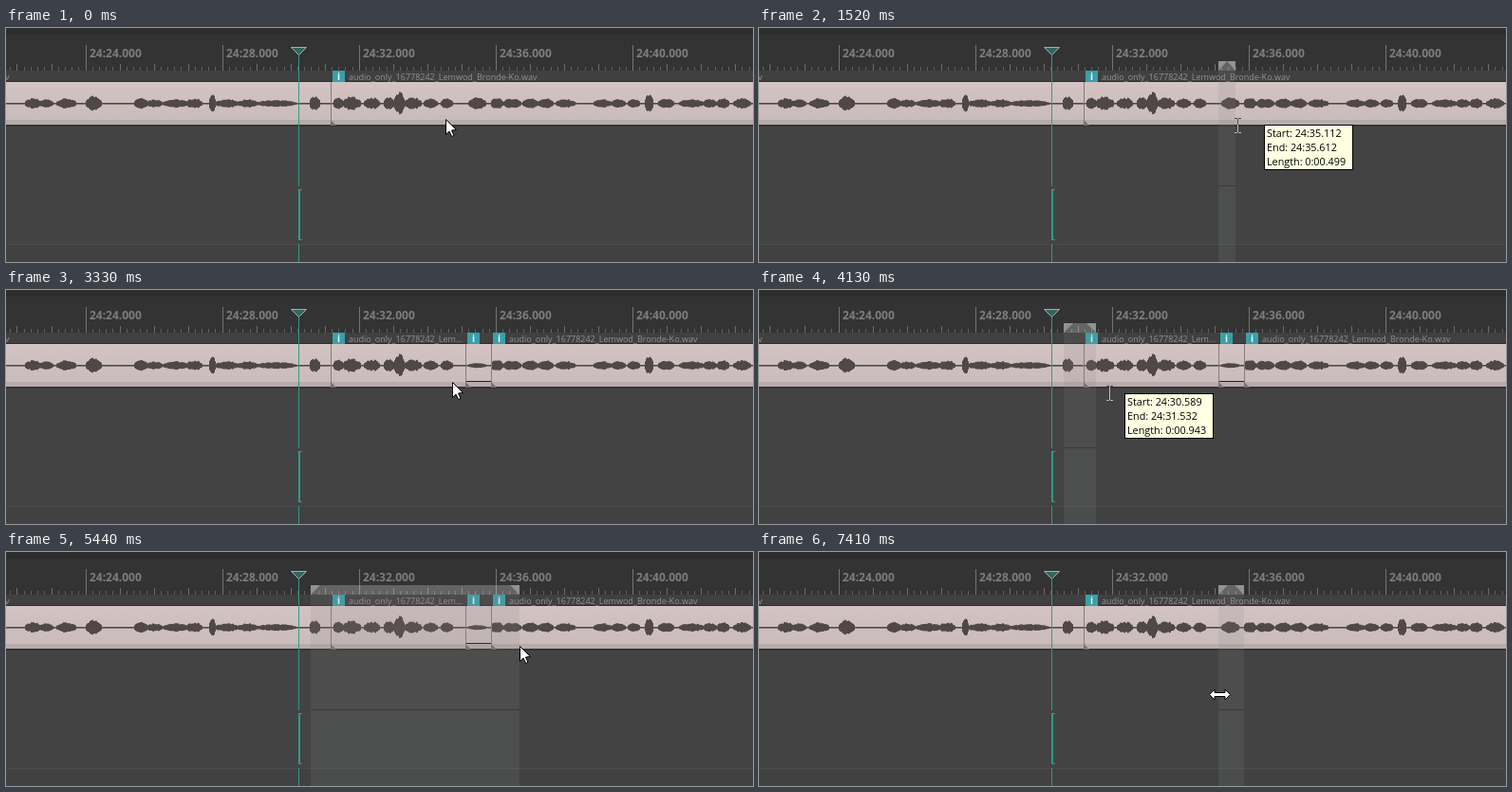
An HTML page with a canvas that plays this animation: 787 px wide and 247 px high, repeating every 8 s.

```html
<!DOCTYPE html>
<html lang="en">
<head>
<meta charset="utf-8">
<title>Audio timeline</title>
<style>
html, body { margin: 0; width: 100%; height: 100%; overflow: hidden; background: #434343; }
canvas { display: block; }
</style>
</head>
<body>
<canvas id="stage" width="787" height="247"></canvas>
<script>
const ctx = document.getElementById('stage').getContext('2d');
const W = 787, H = 247, LOOP = 8000;
const SEC_PER_PX = 0.02775;
const FONT = '"Open Sans", "Noto Sans", sans-serif';
const CLIP = 'audio_only_16778242_Lemwod_Bronde-Ko.wav';
const TEAL = '#2f9a8c';

// Each layout lists clips as [left edge, label]; quiet is the attenuated span.
const LAYOUTS = [
  { clips: [[342, CLIP]], quiet: [0, 0] },
  { clips: [[342, CLIP.slice(0, 23) + '...'], [484, ''], [511, CLIP]], quiet: [484, 511] },
  { clips: [[321, ''], [342, '[-10.00dB] ' + CLIP.slice(0, 15) + '...'], [484, ''], [511, ''], [541, CLIP]],
    quiet: [321, 541] }
];

// Every step changes only the properties it names.
const STEPS = [
  [0, { cursor: 'arrow', x: 463, y: 96, layout: 0, from: 0, to: 0, tip: 0 }],
  [120, { x: 464 }],
  [270, { x: 472, y: 99 }],
  [390, { x: 482, y: 101 }],
  [510, { cursor: 'beam', x: 499, y: 106 }],
  [760, { x: 496, y: 107 }],
  [880, { x: 490, y: 109 }],
  [1000, { x: 486, y: 110 }],
  [1250, { x: 491, y: 110 }],
  [1400, { x: 498, y: 108, from: 484, to: 494, tip: 107 }],
  [1520, { x: 504, y: 103, to: 502, tip: 102 }],
  [1640, { x: 508, y: 102, to: 506, tip: 101 }],
  [1760, { x: 511, y: 102, to: 509, tip: 101 }],
  [1880, { x: 513, y: 101, to: 511, tip: 100 }],
  [2270, { cursor: 'arrow', x: 511, y: 100 }],
  [2420, { tip: 0 }],
  [2670, { x: 508, y: 97, layout: 1, to: 0, from: 0 }],
  [3330, { x: 470, y: 97 }],
  [3460, { x: 404, y: 97 }],
  [3590, { cursor: 'beam', x: 351, y: 106 }],
  [3730, { x: 334, y: 111 }],
  [3850, { x: 323, y: 113 }],
  [4130, { x: 369, y: 109, from: 321, to: 355, tip: 109 }],
  [4280, { x: 448, y: 105, to: 432, tip: 105 }],
  [4400, { x: 516, y: 99, to: 508, tip: 99 }],
  [4540, { x: 536, y: 96, to: 532, tip: 95 }],
  [4660, { x: 541, y: 95, to: 538, tip: 94 }],
  [4790, { x: 543, y: 95, to: 541, tip: 94 }],
  [5440, { cursor: 'arrow', x: 541, y: 99, tip: 0 }],
  [5600, { cursor: 'beam', x: 487, y: 151 }],
  [5970, { layout: 2, from: 0, to: 0 }],
  [6730, { cursor: 'arrow', x: 489, y: 147 }],
  [7010, { layout: 1, from: 321, to: 541 }],
  [7260, { from: 0, to: 0 }],
  [7410, { cursor: 'resize', x: 485, y: 150, layout: 0, from: 484, to: 511 }]
];

// Speech bursts: centre, half width, height.
const BURSTS = [
  [28, 9, 5], [42, 8, 4], [63, 11, 5], [92, 9, 8], [142, 8, 6], [156, 9, 4],
  [178, 14, 4], [198, 9, 5], [217, 4, 9], [232, 13, 4], [254, 11, 4], [284, 22, 3],
  [325, 6, 8], [350, 6, 6], [364, 10, 7], [385, 9, 6], [403, 6, 7], [414, 6, 12],
  [428, 10, 6], [447, 8, 5], [464, 7, 5], [496, 10, 6], [517, 7, 6], [533, 10, 5],
  [552, 9, 5], [568, 9, 5], [589, 11, 4], [628, 10, 4], [645, 8, 4], [661, 7, 4],
  [677, 5, 9], [695, 9, 5], [722, 14, 4], [741, 8, 4], [755, 7, 5], [775, 10, 5]
];

function rect(color, x, y, w, h) {
  ctx.fillStyle = color;
  ctx.fillRect(x, y, w, h);
}

function poly(points, fill, stroke) {
  ctx.beginPath();
  points.forEach(([x, y]) => ctx.lineTo(x, y));
  ctx.closePath();
  if (fill) { ctx.fillStyle = fill; ctx.fill(); }
  if (stroke) { ctx.strokeStyle = stroke; ctx.lineWidth = 1; ctx.stroke(); }
}

function text(str, x, y, font, color) {
  ctx.font = font + ' ' + FONT;
  ctx.fillStyle = color;
  ctx.fillText(str, x, y);
}

function timeAt(x) { return 30.5894 + (x - 321) * SEC_PER_PX; }
function xAt(sec) { return Math.round(321 + (sec - 30.5894) / SEC_PER_PX); }

function clock(sec) {
  return (Math.floor(sec * 1000) / 1000).toFixed(3);
}

function noise(n) {
  const v = Math.sin(n * 12.9898) * 43758.5453;
  return v - Math.floor(v);
}

function loudness(x) {
  let peak = 0;
  for (const [centre, half, height] of BURSTS) {
    const d = (x - centre) / half;
    if (Math.abs(d) < 1) peak = Math.max(peak, height * (1 - d * d) ** 0.7);
  }
  return peak * (0.68 + 0.32 * noise(Math.floor(x / 2)));
}

function drawRuler() {
  rect('#2d2d2d', 0, 0, W, 7);
  rect('#333333', 0, 7, W, 38);
  for (let i = 0; i < 115; i++) {
    const sec = 21.6 + i * 0.2, x = xAt(sec);
    const tenths = Math.round(sec * 10);
    if (tenths % 40 === 0) {
      rect('#747474', x, 18, 1, 27);
      text('24:' + tenths / 10 + '.000', x + 4, 31, 'bold 12px', '#7d7d7d');
    } else if (tenths % 10 === 0) {
      rect('#6c6c6c', x, 38, 1, 7);
    } else {
      rect('#5e5e5e', x, 41, 1, 4);
    }
  }
}

function drawTrack({ clips, quiet }) {
  rect('#404040', 0, 45, W, 12);
  text('v', -1, 55, '9px', '#929292');
  const body = ctx.createLinearGradient(0, 57, 0, 97);
  body.addColorStop(0, '#d3c3c3');
  body.addColorStop(1, '#cabcbc');
  rect('#2e2c2c', 0, 56, W, 1);
  rect(body, 0, 57, W, 40);
  rect('#b7abab', 0, 97, W, 5);
  rect('#363333', 0, 102, W, 2);

  for (let x = 0; x < W; x++) {
    const gain = x >= quiet[0] && x < quiet[1] ? 0.316 : 1;
    const a = loudness(x) * gain;
    rect('#504848', x, 79 - a, 1, 1.6 + a * 1.9);
  }
  if (quiet[1]) rect('#221f1f', quiet[0], 96, quiet[1] - quiet[0], 1);

  for (const [x, label] of clips) {
    rect('#857c7c', x, 57, 1, 46);
    poly([[x, 97], [x + 6, 103], [x, 103]], '#777070');
    rect('#38a0a7', x + 2, 45, 13, 12);
    text('i', x + 7, 55, 'bold 10px', '#f0f8f8');
    text(label, x + 19, 55, '9px', '#929292');
  }
}

function drawSelection(from, to) {
  const w = to - from;
  if (!w) return;
  rect('rgba(255,255,255,.24)', from, 35, w, 10);
  const side = Math.min(10, w / 2);
  poly([[from, 35], [from + side, 35], [from, 45]], '#929292');
  poly([[to, 35], [to - side, 35], [to, 45]], '#929292');
  rect('rgba(138,128,128,.16)', from, 45, w, 121);
  rect('#393939', from, 166, w, 1);
  rect('rgba(128,146,140,.15)', from, 167, w, H - 167);
}

function drawPlayhead() {
  rect(TEAL, 308, 28, 1, 139);
  rect(TEAL, 308, 170, 2, 54);
  rect(TEAL, 309, 170, 3, 1);
  rect(TEAL, 309, 223, 3, 1);
  rect(TEAL, 308, 228, 1, H - 228);
  poly([[300.5, 20.5], [316.5, 20.5], [308.5, 28.5]], '#31665f', '#a3b0ae');
}

function drawTip(from, to, y) {
  const x = to + 30;
  rect('#000', x, y, 94, 48);
  rect('#ffffe1', x + 1, y + 1, 92, 46);
  const lines = [
    'Start: 24:' + clock(timeAt(from)),
    'End: 24:' + clock(timeAt(to)),
    'Length: 0:0' + clock((to - from) * SEC_PER_PX)
  ];
  lines.forEach((line, i) => text(line, x + 3, y + 13 + i * 15, '10.8px', '#000'));
}

const CURSORS = {
  arrow() {
    poly([[0.5, 0.5], [0.5, 16.5], [4, 13], [6.7, 18.5], [9, 17.5], [6.5, 12], [11.5, 11.5]], '#fff', '#000');
  },
  beam() {
    ctx.globalCompositeOperation = 'difference';
    rect('#fff', 0, -7, 1, 14);
    for (const y of [-8, 7]) {
      rect('#fff', -3, y, 3, 1);
      rect('#fff', 1, y, 3, 1);
    }
  },
  resize() {
    const half = [[-10.5, 0.5], [-5, -5], [-5, -1.5], [6, -1.5], [6, -5], [11.5, 0.5]];
    const mirrored = half.slice(1, -1).reverse().map(([x, y]) => [x, 1 - y]);
    poly([...half, ...mirrored], '#fff', '#000');
  }
};

function draw(s) {
  rect('#434343', 0, 0, W, H);
  rect('#4c4c4c', 0, 228, W, 1);
  rect('#414141', 0, 229, W, H - 229);
  drawRuler();
  drawTrack(LAYOUTS[s.layout]);
  drawSelection(s.from, s.to);
  drawPlayhead();
  if (s.tip) drawTip(s.from, s.to, s.tip);
  ctx.save();
  ctx.translate(s.x, s.y);
  CURSORS[s.cursor]();
  ctx.restore();
}

const start = performance.now();
function frame() {
  const t = (performance.now() - start) % LOOP;
  const state = {};
  for (const [at, change] of STEPS) if (at <= t) Object.assign(state, change);
  draw(state);
  requestAnimationFrame(frame);
}
frame();
</script>
</body>
</html>
```
